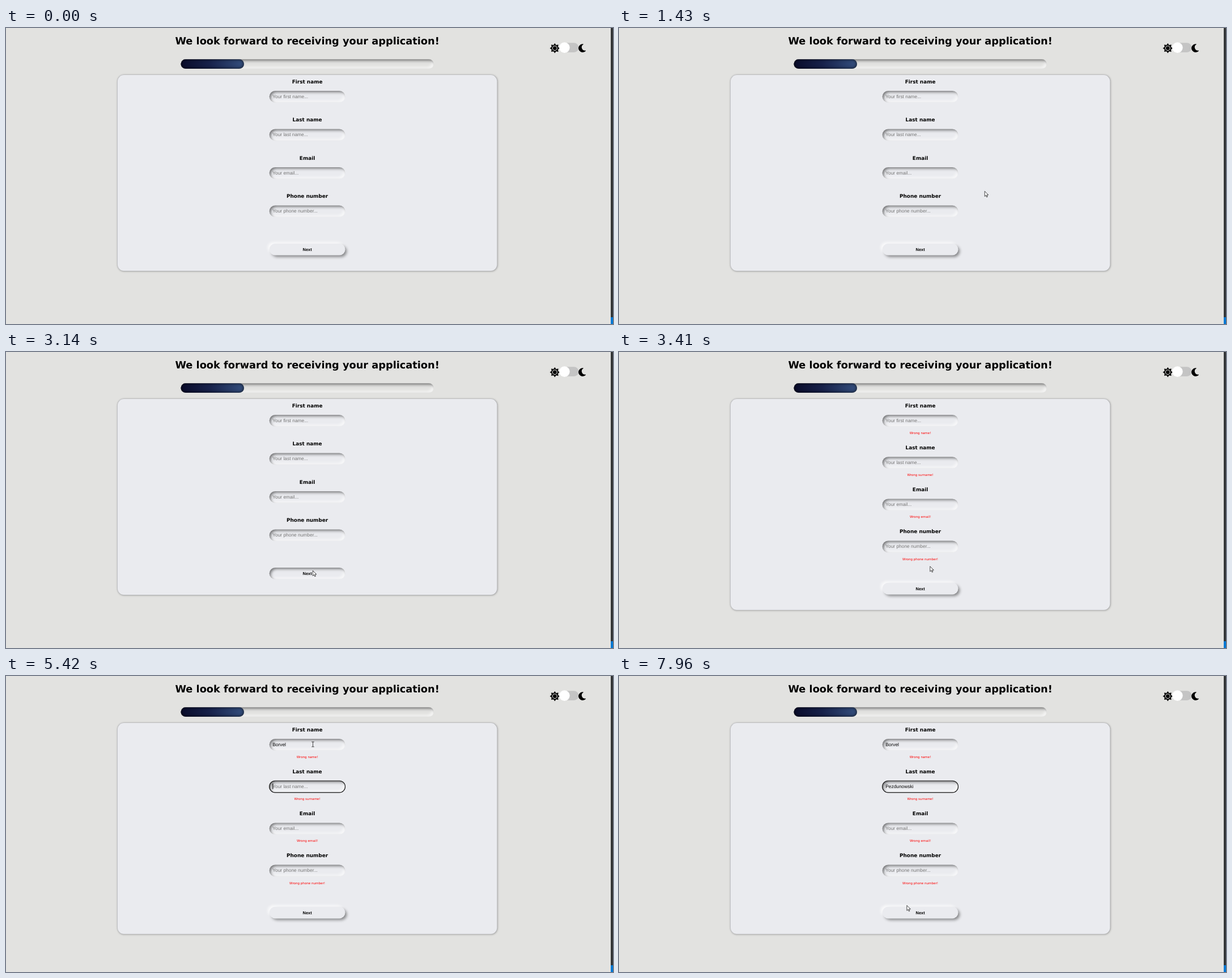
An HTML page that plays this animation: 1071 by 523 pixels, repeating every 8 s.

```html
<!DOCTYPE html>
<html lang="en">
<head>
<meta charset="utf-8">
<title>Application form</title>
<style>
  html, body { margin: 0; width: 100%; height: 100%; overflow: hidden; background: #e2e2e0; }
  #page {
    position: absolute; left: 0; top: 0; width: 1920px; height: 938px;
    transform: scale(.5578); transform-origin: 0 0;
    font-family: Verdana, "DejaVu Sans", sans-serif; color: #000;
    text-rendering: geometricPrecision;
  }
  #page div { position: absolute; box-sizing: border-box; white-space: pre; }
  .line { left: 353px; width: 1200px; height: 40px; line-height: 40px; text-align: center; }
  .title { top: 21.5px; font-size: 31.8px; font-weight: bold; }
  .label { font-size: 15.95px; font-weight: bold; }
  .error { font-size: 10px; color: #f00; }
  .sunken {
    box-shadow: inset 5px 5px 10px -1px rgba(0,0,0,.5), inset -6px -6px 10px -1px rgba(255,255,255,.7);
  }
  .track { left: 553px; top: 99px; width: 800px; height: 30px; border-radius: 15px; }
  .fill {
    left: 553px; top: 99px; width: 200px; height: 30px; border-radius: 15px;
    background: linear-gradient(80deg, #090b2a, #17214a 45%, #35507f);
    box-shadow: inset 0 0 2px rgba(110,115,115,.7), inset 0 0 9px 1px rgba(0,0,0,.7);
  }
  .card {
    left: 353px; top: 148.5px; width: 1200px; border-radius: 20px; background: #eaebef;
    box-shadow: 0 0 0 1px #b6b7bc, 1px 1px 6px 1px rgba(0,0,0,.32);
  }
  .pill { left: 833px; width: 240px; height: 37px; border-radius: 18.5px; }
  .field { padding-left: 10px; font: 15px/37px Arial, "Liberation Sans", sans-serif; }
  .focused { outline: 2px solid #101010; outline-offset: -1px; }
  .hint { color: #757575; }
  .caret {
    display: inline-block; width: 1.5px; height: 17px; margin-right: -1.5px;
    vertical-align: -3px; background: #000;
  }
  .button {
    text-align: center; background: #eaebef;
    font: bold 13.333px/37px Arial, "Liberation Sans", sans-serif;
  }
  .raised {
    box-shadow: 6px 6px 10px -1px rgba(0,0,0,.42), -6px -6px 10px -1px rgba(255,255,255,.75);
  }
  svg { position: absolute; left: 0; top: 0; }
</style>
</head>
<body>
<div id="page">
  <div class="line title">We look forward to receiving your application!</div>
  <div class="track sunken"></div>
  <div class="fill"></div>
  <div class="card"></div>
  <div class="pill button">Next</div>
</div>
<svg width="1071" height="523" viewBox="0 0 1071 523">
  <rect x="1067" width="4" height="523" fill="#333638"/>
  <rect x="1067" y="511" width="4" height="12" fill="#0078d4"/>
  <g transform="translate(968.3 35.7)">
    <path id="sun" stroke="#000" stroke-width=".5" stroke-linejoin="round"/>
    <circle r="3.9" fill="none" stroke="#e2e2e0" stroke-width="1.1"/>
  </g>
  <rect x="977" y="26.2" width="33.5" height="16.8" rx="8.4" fill="#c4c4c4"/>
  <circle cx="985.4" cy="34.6" r="9.3" fill="#fff"/>
  <path transform="translate(1009.3 28.3) scale(.0286)"
    d="M330 4A256 256 0 1 0 482 417L470 398A200 200 0 0 1 334 26Z"/>
  <g id="cursor">
    <path id="arrow" transform="scale(.5578)" fill="#fff" stroke="#000" stroke-width="1.3"
      d="M.6 .6V17L4.4 13.4L6.9 19.2L9.5 18.1L7.1 12.4H12.2Z"/>
    <path id="beam" fill="none" stroke="#222" stroke-width=".8"
      d="M-2.3 -4.3H2.3M-2.3 4.3H2.3M0 -4.3V4.3"/>
  </g>
</svg>
<script>
const LOOP = 8000, SCALE = .5578;
const ERRORS_AT = 3210, PRESS_AT = 3070, CARET_BLINK = 530;

const $ = selector => document.querySelector(selector);
const page = $('#page');

function add(parent, tag, className, text = '') {
  const el = document.createElement(tag);
  el.className = className;
  el.textContent = text;
  return parent.appendChild(el);
}

// Evenly spaced key presses from first to last.
const keys = (first, last, count) =>
  Array.from({ length: count }, (_, i) => first + (last - first) * i / Math.max(1, count - 1));

const forms = [
  { label: 'First name', hint: 'Your first name...', error: 'Wrong name!', value: 'Borvel',
    focus: 4100, blur: 5420, keys: [4560, 4760, 4830, ...keys(5030, 5290, 3)] },
  { label: 'Last name', hint: 'Your last name...', error: 'Wrong surname!', value: 'Pezdunowski',
    focus: 5420, blur: LOOP, keys: [5820, 5950, ...keys(6150, 6810, 8), 7010] },
  { label: 'Email', hint: 'Your email...', error: 'Wrong email!' },
  { label: 'Phone number', hint: 'Your phone number...', error: 'Wrong phone number!' }
].map(form => {
  const title = add(page, 'div', 'line label', form.label);
  const box = add(page, 'div', 'pill field sunken');
  const typed = add(box, 'span', '');
  const caret = add(box, 'i', 'caret');
  const hint = add(box, 'span', 'hint', form.hint);
  const error = add(page, 'div', 'line error', form.error);
  return { value: '', focus: LOOP, blur: LOOP, keys: [], ...form,
           el: { title, box, typed, caret, hint, error } };
});

// Pointer moves: start, end, number of steps, Bezier points.
const moves = [
  [530, 1020, 8, [[989, 505], [730, 301], [667, 362]]],
  [1220, 1920, 11, [[667, 362], [640, 239], [548, 116]]],
  [2380, 2870, 8, [[548, 116], [563, 250], [541, 386]]],
  [3410, 4100, 10, [[541, 386], [679, 250], [541.5, 120.7]]],
  [7540, 7960, 7, [[541.5, 120.7], [600, 200], [470, 330], [507.6, 405]]]
];

function bezier(points, u) {
  while (points.length > 1) {
    points = points.slice(1).map((p, i) => p.map((v, k) => points[i][k] + (v - points[i][k]) * u));
  }
  return points[0];
}

function pointerAt(t) {
  const [start, end, steps, points] = moves.filter(m => t >= m[0]).pop() || [0, 1, 1, [[989, 505]]];
  const step = (end - start) / (steps - 1);
  const p = Math.min(1, (Math.floor((t - start) / step + 1e-6) + 1) / steps);
  return bezier(points, p * p * (3 - 2 * p));
}

function drawForm(form, i, t, gap) {
  const { title, box, typed, caret, hint, error } = form.el;
  const top = 199 + i * gap;
  const count = form.keys.filter(k => t >= k).length;
  const focused = t >= form.focus && t < form.blur;
  const lastInput = count ? form.keys[count - 1] : form.focus;
  const caretOn = focused && Math.floor((t - lastInput) / CARET_BLINK) % 2 === 0;
  title.style.top = top - 49 + 'px';
  box.style.top = top + 'px';
  error.style.top = top + 39 + 'px';
  error.style.display = t >= ERRORS_AT ? '' : 'none';
  box.classList.toggle('focused', focused);
  typed.textContent = form.value.slice(0, count);
  hint.style.display = count ? 'none' : '';
  caret.style.visibility = caretOn ? 'visible' : 'hidden';
  return (top + 18.5) * SCALE;
}

function draw(t) {
  const failed = t >= ERRORS_AT;
  const centers = forms.map((form, i) => drawForm(form, i, t, failed ? 133 : 121));

  $('.card').style.height = (failed ? 668 : 620) + 'px';
  const button = $('.button');
  const pressed = t >= PRESS_AT && !failed;
  button.style.top = (failed ? 731 : 683) + 'px';
  button.classList.toggle('sunken', pressed);
  button.classList.toggle('raised', !pressed);

  const [x, y] = pointerAt(t);
  const overField = x > 464 && x < 599 && centers.some(c => Math.abs(y - c) < 10);
  $('#cursor').setAttribute('transform', `translate(${x} ${y})`);
  $('#cursor').style.display = t >= 200 ? '' : 'none';
  $('#arrow').style.display = overField ? 'none' : '';
  $('#beam').style.display = overField ? '' : 'none';
}

const rays = Array.from({ length: 16 }, (_, i) => {
  const r = i % 2 ? 5.7 : 8.5, a = i * Math.PI / 8;
  return [r * Math.cos(a), r * Math.sin(a)];
});
$('#sun').setAttribute('d', 'M' + rays.join('L') + 'Z');

const began = performance.now();
function frame() {
  draw((performance.now() - began) % LOOP);
  requestAnimationFrame(frame);
}
frame();
</script>
</body>
</html>
```
